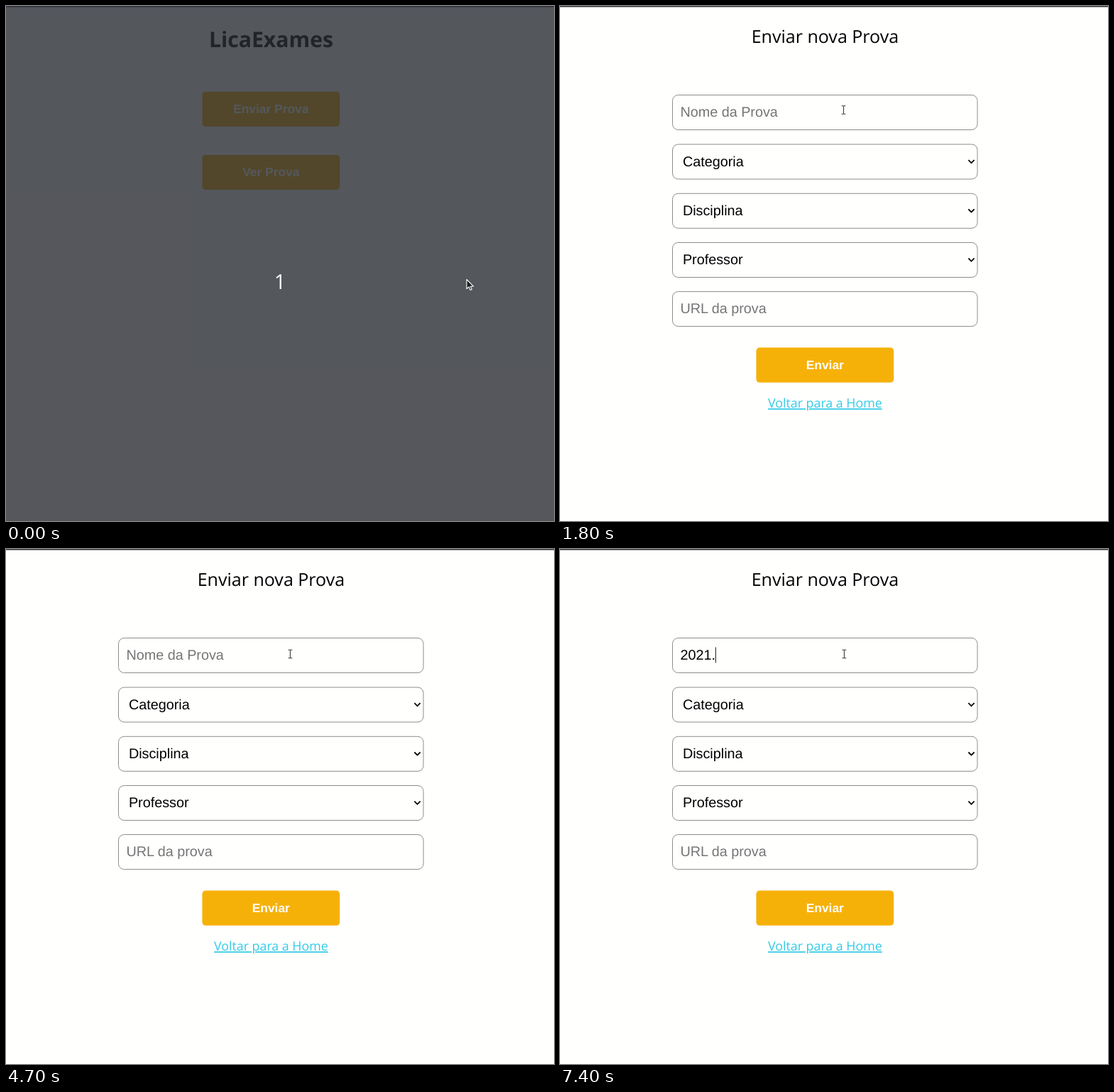
An HTML page for the animation above (8000 ms loop, 772x726 px).

```html
<!DOCTYPE html>
<html lang="pt-BR">
<head>
<meta charset="utf-8">
<title>Enviar prova</title>
<style>
  html, body { margin: 0; width: 100%; height: 100%; overflow: hidden; background: #fffffe; }
  svg { display: block; width: 772px; height: 726px; }
  text { text-rendering: geometricPrecision; white-space: pre; }
  .sans { font-family: "Open Sans", "Noto Sans", sans-serif; text-anchor: middle; }
  .title { font-size: 30.2px; font-weight: 700; }
  .heading { font-size: 25px; }
  .link { font-size: 17.8px; fill: #33cbe6; text-decoration: underline; }
  .count { font-size: 29px; fill: #fff; }
  .btn rect { fill: #f6b109; }
  .btn text { font: 700 17.4px "Liberation Sans", Arial, sans-serif; fill: #fffffe; text-anchor: middle; }
  .field rect { fill: #fffffe; stroke: #8c8c8c; }
  .field text { font: 19.8px "Liberation Sans", Arial, sans-serif; }
  .field path { fill: none; stroke: #000; stroke-width: 1.8; }
  .field .hint { fill: #757575; }
</style>
</head>
<body>
<svg viewBox="0 0 772 726">
  <rect width="772" height="726" fill="#fffffe"/>
  <rect width="772" height="1.5" fill="#343437"/>

  <g id="home">
    <text class="sans title" x="373.5" y="58">LicaExames</text>
  </g>

  <g id="form">
    <text class="sans heading" x="373.4" y="52.3">Enviar nova Prova</text>
    <text class="sans link" x="373.4" y="566.3">Voltar para a Home</text>
  </g>

  <rect id="caret" y="139" width="1.1" height="22" fill="#222"/>

  <g id="dim">
    <rect width="772" height="726" fill="#2a2d34" fill-opacity=".8"/>
    <text class="sans count" x="386" y="399">1</text>
  </g>

  <g id="arrow">
    <path d="M0 0V13.2L3.1 10.4L5.2 15L7.3 14.1L5.2 9.7H9.4Z"
          fill="#1c1c1e" stroke="#fff" stroke-width="1.1" stroke-linejoin="round"/>
  </g>
  <g id="hand">
    <path d="M-1.3 8.2V1Q-1.3 -.3 0 -.3T1.3 1V5.3Q2.6 4.6 3.7 5.6Q5 5 6 6.2Q8.4 5.8 8.4 8V10.5Q8.4 12.4 7.4 13.6V14.6H-.6V13.4L-4.6 9Q-5.2 7.6 -4 7.2Q-3 7 -1.3 8.2Z"
          fill="#fff" stroke="#222" stroke-width="1.1" stroke-linejoin="round"/>
    <path d="M1.3 5.3V8M3.7 5.6V8.2M6 6.2V8.4" fill="none" stroke="#222" stroke-width=".8"/>
  </g>
  <g id="beam">
    <path d="M-2.9 -5.8H-.8L0 -5.2L.8 -5.8H2.9M0 -5.2V5.2M-2.9 5.8H-.8L0 5.2L.8 5.8H2.9"
          fill="none" stroke="#3c3c3c" stroke-width="1.1"/>
  </g>
</svg>

<script>
const LOOP = 8000;
const FIELD_X = 169.4;
const DIGIT = 11.01;
const $ = id => document.getElementById(id);

function add(parent, tag, attrs, text) {
  const el = document.createElementNS("http://www.w3.org/2000/svg", tag);
  for (const key in attrs) el.setAttribute(key, attrs[key]);
  if (text) el.textContent = text;
  return parent.appendChild(el);
}

function button(page, y, label, base) {
  const g = add($(page), "g", { class: "btn" });
  add(g, "rect", { x: 276.4, y, width: 193.8, height: 49.2, rx: 4.8 });
  add(g, "text", { x: 373.3, y: base }, label);
}

function field(y, label, isSelect) {
  const g = add($("form"), "g", { class: "field" });
  add(g, "rect", { x: 158.5, y, width: 429.5, height: 49, rx: 8 });
  if (isSelect) add(g, "path", { d: `M575.4 ${y + 22.2}l4.1 4.1l4.1 -4.1` });
  return add(g, "text", {
    x: isSelect ? 172.9 : FIELD_X, y: y + 30.6, class: isSelect ? "" : "hint"
  }, label);
}

button("home", 120.7, "Enviar Prova", 150.7);
button("home", 209.9, "Ver Prova", 240);
button("form", 481.6, "Enviar", 512.4);

const nameText = field(125.5, "Nome da Prova", false);
field(195, "Categoria", true);
field(264.3, "Disciplina", true);
field(333.5, "Professor", true);
field(402.6, "URL da prova", false);

// Pointer steps: time, shape, x, y
const pointer = [
  [0, "arrow", 649, 385.5],
  [800, "arrow", 619, 356],
  [900, "arrow", 525, 265],
  [1000, "arrow", 431, 174],
  [1100, "hand", 400.7, 144.2],
  [1800, "beam", 399.5, 146.5],
  [2300, "beam", 400.9, 147.3],
  [2400, "beam", 400, 147.4],
  [3500, "beam", 400.4, 148]
];

// Name field steps: time, typed text, caret shown
const typing = [
  [0, "", 0],
  [2300, "", 1],
  [3100, "", 0],
  [3900, "", 1],
  [4700, "", 0],
  [5300, "20", 1],
  [6000, "202", 1],
  [6200, "2021", 1],
  [7000, "2021", 0],
  [7400, "2021.", 1]
];

const stepAt = (steps, t) => steps.filter(s => s[0] <= t).pop();
const show = (id, on) => { $(id).style.display = on ? "" : "none"; };

function render(t) {
  show("dim", t < 200);
  show("home", t < 1800);
  show("form", t >= 1800);

  const [, shape, x, y] = stepAt(pointer, t);
  for (const id of ["arrow", "hand", "beam"]) show(id, id === shape);
  $(shape).setAttribute("transform", `translate(${x} ${y})`);

  const [, typed, caretOn] = stepAt(typing, t);
  const value = typed || "Nome da Prova";
  if (nameText.textContent !== value) nameText.textContent = value;
  nameText.setAttribute("class", typed ? "" : "hint");

  const dots = typed.split(".").length - 1;
  const width = (typed.length - dots / 2) * DIGIT;
  $("caret").setAttribute("x", FIELD_X - 0.2 + width);
  $("caret").setAttribute("y", typed ? 138.5 : 139.2);
  show("caret", caretOn);
}

const start = performance.now();
function tick() {
  render((performance.now() - start) % LOOP);
  requestAnimationFrame(tick);
}
tick();
</script>
</body>
</html>
```
